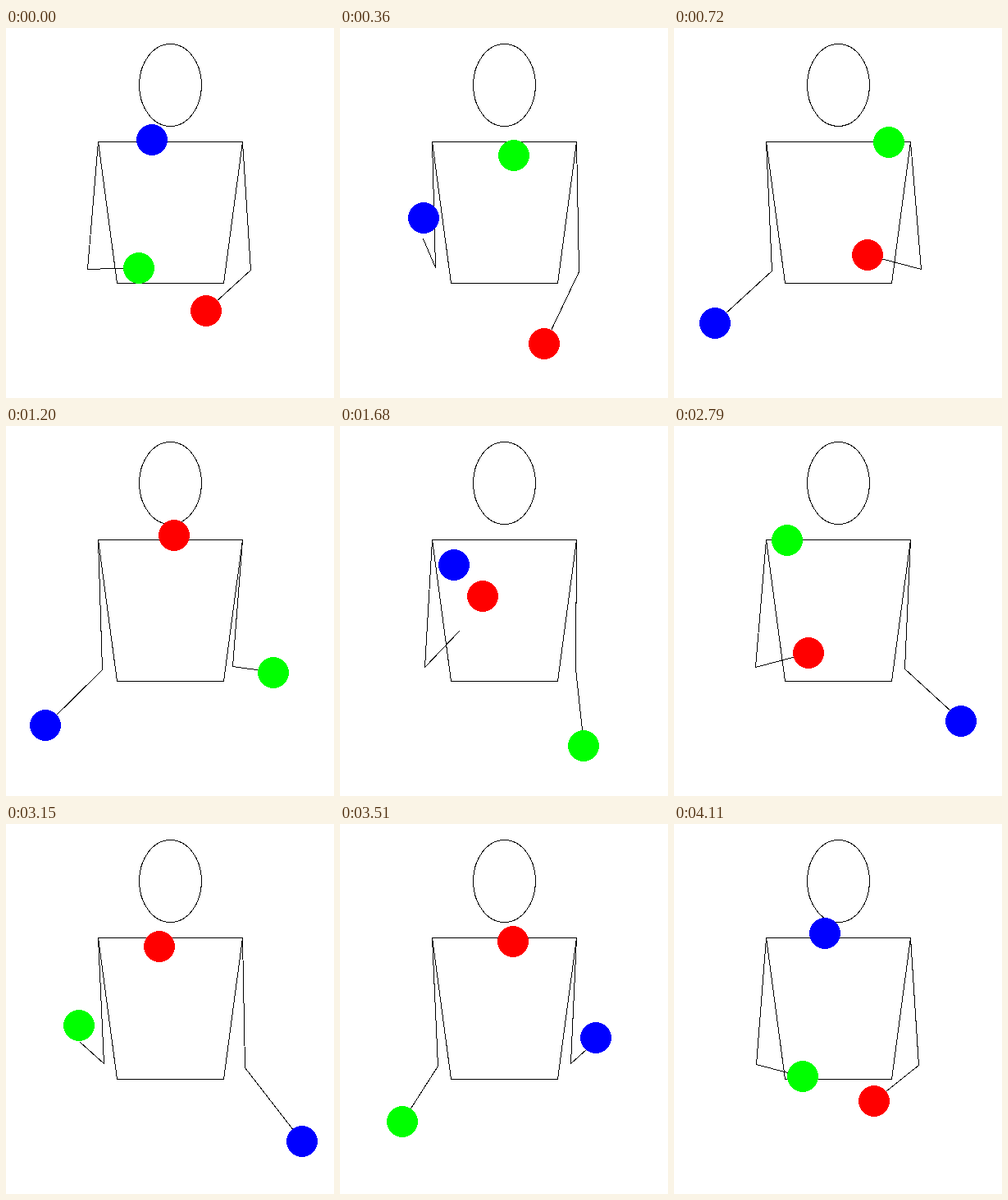
These frames come from a looping animation (400x450 px, 4140 ms). An HTML page:

```html
<!DOCTYPE html>
<html>
<head>
<meta charset="utf-8">
<style>
html, body { margin: 0; width: 100%; height: 100%; overflow: hidden; background: #fff; }
svg { display: block; }
</style>
</head>
<body>
<svg width="400" height="450" shape-rendering="crispEdges" fill="none" stroke="#000">
  <ellipse cx="200.5" cy="69.5" rx="38" ry="50"/>
  <path d="M112.5 138.5H288.5L265.5 310.5H135.5Z"/>
  <path id="left"/>
  <path id="right"/>
  <g stroke="none">
    <circle r="19" fill="#f00"/>
    <circle r="19" fill="#0f0"/>
    <circle r="19" fill="#00f"/>
  </g>
</svg>
<script>
// Lengths in cm (x from the midline, y up from hand level), time in ticks of 30 ms.
const TICK = 30, LOOP = 138, HALF = 69, CYCLE = 46;
const AIR = 39.1, EMPTY = 16.1, HOLD = CYCLE - EMPTY;
const GRAVITY = 980 * 0.015 ** 2, RISE = GRAVITY * AIR / 2;
const SCALE = 3.826, MID = 200, LEVEL = 291.2;
const SHOULDER = { x: -23, y: 40 }, DEPTH = 30, ARM = 41.25;

// The left hand's three throws and the catch that follows each one.
const throwX = [-10, -32.5, -10];
const catchX = [-32.5, -10, -32.5];
const softness = [0.592, 0.473, 0.543];
const speed = throwX.map((x, i) => (-catchX[(i + 2) % 3] - x) / AIR);

const mod = (a, b) => ((a % b) + b) % b;
const px = x => Math.round(MID + x * SCALE);
const py = (y, shift = 0) => Math.round(LEVEL - y * SCALE + shift);

function hermite(s, len, a, b, va, vb) {
  const r = 1 - s;
  return a + (b - a) * s * s * (3 - 2 * s) + len * s * r * (r * va - s * vb);
}

function leftHand(n) {
  const t = mod(n, LOOP), i = Math.floor(t / CYCLE), next = (i + 1) % 3;
  const u = t - i * CYCLE, k = softness[i];
  const vx = -k * speed[next], vy = -k * RISE;
  if (u < EMPTY) {
    const s = u / EMPTY;
    return [hermite(s, EMPTY, throwX[i], catchX[i], speed[i], vx),
            hermite(s, EMPTY, 0, 0, RISE, vy)];
  }
  const s = (u - EMPTY) / HOLD;
  return [hermite(s, HOLD, catchX[i], throwX[next], vx, speed[next]),
          hermite(s, HOLD, 0, 0, vy, RISE)];
}

function ball(i, n) {
  let p = mod(n - i * CYCLE, LOOP), side = 1;
  if (p >= HALF) { p -= HALF; side = -1; }
  if (p < AIR)
    return [side * (throwX[i] + speed[i] * p), RISE * p - GRAVITY * p * p / 2];
  const [x, y] = leftHand(i * CYCLE + p - HALF);
  return [-side * x, y];
}

// The elbow hangs below the shoulder-hand line, in its vertical plane.
function armPath(n, side) {
  const [x, y] = leftHand(n);
  const dx = x - SHOULDER.x, dy = y - SHOULDER.y;
  const flat = Math.hypot(dx, DEPTH), dist = Math.hypot(flat, dy);
  const bend = Math.sqrt(Math.max(0, ARM * ARM - dist * dist / 4));
  const ex = SHOULDER.x + dx * (0.5 + bend * dy / (dist * flat));
  const ey = SHOULDER.y + dy / 2 - bend * flat / dist;
  const points = [[SHOULDER.x, SHOULDER.y], [ex, ey], [x, y]];
  return "M" + points.map(([a, b]) => `${px(side * a) + 0.5} ${py(b) + 0.5}`).join("L");
}

const left = document.getElementById("left"), right = document.getElementById("right");
const circles = document.querySelectorAll("circle");
const order = [2, 0, 1];

function draw() {
  const n = Math.floor(performance.now() / TICK) % LOOP;
  left.setAttribute("d", armPath(n, 1));
  right.setAttribute("d", armPath(n - HALF, -1));
  circles.forEach((c, i) => {
    const [x, y] = ball(order[i], n);
    c.setAttribute("cx", px(x));
    c.setAttribute("cy", py(y, 0.5));
  });
  requestAnimationFrame(draw);
}
draw();
</script>
</body>
</html>
```
